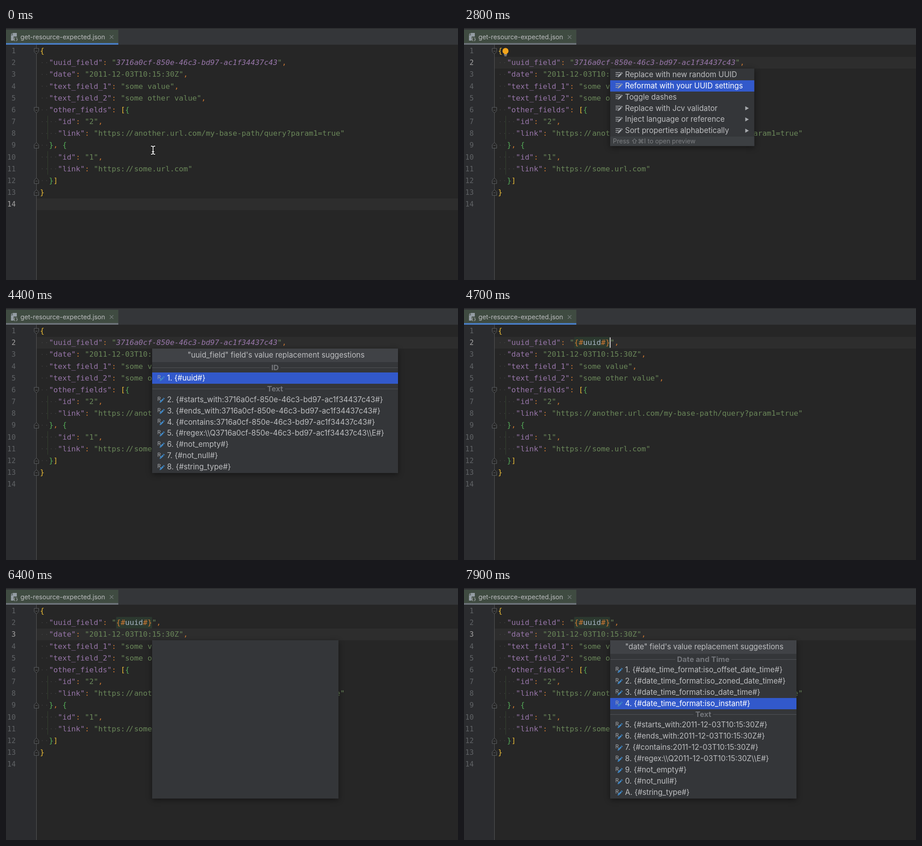
An HTML page with a canvas that plays this animation: 1002 px wide and 559 px high, repeating every 8 s.

```html
<!DOCTYPE html>
<html lang="en">
<head>
<meta charset="utf-8">
<title>Editor suggestions</title>
<style>
  html, body { margin: 0; width: 100%; height: 100%; overflow: hidden; background: #262626; }
  canvas { display: block; }
</style>
</head>
<body>
<canvas id="stage" width="1002" height="559"></canvas>
<script>
const ctx = document.getElementById('stage').getContext('2d');
const W = 1002, H = 559, LOOP = 8000;
const CODE_X = 75.3, CHAR = 9.935, LINE_TOP = 37.6, LINE_H = 26.17;
const ROW_H = 24.9, SEPARATOR_H = 22.9, TITLE_H = 30, POPUP_X = 324, CARET_COL = 25;
const MONO = '"DejaVu Sans Mono", "Noto Sans Mono", monospace';
const UI = 'Inter, "DejaVu Sans", sans-serif';
const UI_FONT = `16.6px ${UI}`;
const C = {
  editor: '#262626', gutter: '#2b2c2f', bar: '#343639', row: '#2d2d2d', popup: '#343639',
  key: '#9876aa', string: '#6a8759', punct: '#cc7832', yellow: '#e8ba36', green: '#54a857',
  text: '#bdbec0', dim: '#606366', select: '#3259cb', grey: '#a6a9ad'
};

const UUID = '3716a0cf-850e-46c3-bd97-ac1f34437c43';
const DATE = '2011-12-03T10:15:30Z';
const LINES = [
  '{',
  `  "uuid_field": "${UUID}",`,
  `  "date": "${DATE}",`,
  '  "text_field_1": "some value",',
  '  "text_field_2": "some other value",',
  '  "other_fields": [{',
  '    "id": "2",',
  '    "link": "https://another.url.com/my-base-path/query?param1=true"',
  '  }, {',
  '    "id": "1",',
  '    "link": "https://some.url.com"',
  '  }]',
  '}',
  ''
];
const TEMPLATE_LINE = '  "uuid_field": "{#uuid#}",';

const commonActions = ['Replace with Jcv validator', 'Inject language or reference', 'Sort properties alphabetically'];
const uuidActions = ['Replace with new random UUID', 'Reformat with your UUID settings', 'Toggle dashes', ...commonActions];
const textValidators = value => ['starts_with:' + value, 'ends_with:' + value, 'contains:' + value,
  `regex:\\\\Q${value}\\\\E`, 'not_empty', 'not_null', 'string_type'];
const isoFormats = ['offset_date_time', 'zoned_date_time', 'date_time', 'instant']
  .map(name => 'date_time_format:iso_' + name);

const lineTop = n => LINE_TOP + (n - 1) * LINE_H;
const colX = col => CODE_X + col * CHAR;

function rect(x, y, w, h, color) {
  ctx.fillStyle = color;
  ctx.fillRect(x, y, w, h);
}

function text(str, x, y, color, font, align = 'left') {
  ctx.font = font;
  ctx.textAlign = align;
  ctx.fillStyle = color;
  ctx.fillText(str, x, y);
}

function stroke(points, color, width = 1, close = false) {
  ctx.beginPath();
  points.forEach(([x, y]) => ctx.lineTo(x, y));
  if (close) ctx.closePath();
  ctx.strokeStyle = color;
  ctx.lineWidth = width;
  ctx.stroke();
}

function fillShape(points, color) {
  ctx.beginPath();
  points.forEach(([x, y]) => ctx.lineTo(x, y));
  ctx.fillStyle = color;
  ctx.fill();
}

function code(str, col, y, color, style = '') {
  const font = `${style} 16.5px ${MONO}`;
  const split = str.indexOf('//');
  if (split < 0) return text(str, colX(col), y, color, font);
  // Double slashes sit close together, as a ligature
  text(str.slice(0, split), colX(col), y, color, font);
  text('/', colX(col + split) + 1.6, y, color, font);
  text('/', colX(col + split + 1) - 1.6, y, color, font);
  text(str.slice(split + 2), colX(col + split + 2), y, color, font);
}

function drawString(str, col, y) {
  const inner = str.slice(1, -1);
  if (inner === UUID) {
    code('"', col, y, C.string);
    code(inner, col + 1, y, C.key, 'italic');
    code('"', col + 1 + inner.length, y, C.string);
  } else if (inner === '{#uuid#}') {
    rect(colX(col + 1), y - 18, 8 * CHAR, 25.5, '#2c392f');
    code('"', col, y, C.string);
    code('{#', col + 1, y, C.punct);
    code('uuid', col + 3, y, '#a9b7c6');
    code('#}', col + 7, y, C.punct);
    code('"', col + 9, y, C.string);
  } else code(str, col, y, C.string);
}

function drawLine(line, n) {
  const y = lineTop(n) + 18.4;
  const indent = line.search(/\S|$/);
  for (let i = 0; i < indent; i++) rect(colX(i + .5) - .7, y - 6, 1.4, 1.4, '#4b4b4b');
  for (const { 0: token, index } of line.matchAll(/"[^"]*"|[^\s"]/g)) {
    const isKey = line[index + token.length] === ':';
    if (token[0] === '"') isKey ? code(token, index, y, C.key) : drawString(token, index, y);
    else {
      const nested = '{}'.includes(token) && indent + index > 0;
      code(token, index, y, ':,'.includes(token) ? C.punct : nested ? C.green : C.yellow);
    }
  }
}

function foldMark(n, dir) {
  const y = lineTop(n) + 13.6;
  const shape = [[62.5, -6], [72.5, -6], [72.5, 1.5], [67.5, 6.5], [62.5, 1.5]].map(([x, dy]) => [x, y + dy * dir]);
  fillShape(shape, C.editor);
  stroke(shape, C.dim, 1, true);
  stroke([[65, Math.floor(y) + .5], [70, Math.floor(y) + .5]], C.dim);
}

function drawTab(focused) {
  rect(0, 0, W, 37, C.bar);
  rect(0, 0, W, 3, '#2a2b2d');
  rect(0, 2, W, 1, '#3b3c3e');
  rect(0, 4, 249, 33, '#3f4b41');
  rect(0, 33.5, 249, 3.5, focused ? '#4a80cb' : '#6f757c');
  fillShape([[15, 11], [24, 11], [24, 19], [17, 19], [17, 28], [11, 28], [11, 16], [15, 16]], '#939ca3');
  fillShape([[10.5, 15], [14, 11], [14, 15]], '#939ca3');
  text('{}', 16, 28, C.grey, `bold 9px ${MONO}`);
  text('get-resource-expected.json', 32, 25, C.text, `14.2px ${UI}`);
  stroke([[230, 16], [238, 24]], '#73797a', 1.2);
  stroke([[238, 16], [230, 24]], '#73797a', 1.2);
}

function drawEditor(active, replaced, focused) {
  rect(0, 0, W, H, C.editor);
  rect(0, 37, 67, H, C.gutter);
  rect(68, Math.round(lineTop(active)), W, 26, C.row);
  drawTab(focused);
  rect(67, 37, 1, H, '#555657');
  for (const n of [7, 10]) rect(92, lineTop(n), 1, 2 * LINE_H, '#34432f');
  LINES.forEach((line, i) => {
    const n = i + 1;
    text(n, 21.5, lineTop(n) + 18.4, n === active ? '#a4a3a3' : C.dim, `15.5px ${MONO}`, 'right');
    drawLine(replaced && n === 2 ? TEMPLATE_LINE : line, n);
  });
  [1, 6].forEach(n => foldMark(n, 1));
  [9, 12, 13].forEach(n => foldMark(n, -1));
}

function popupBox(y, w, h) {
  ctx.save();
  ctx.shadowColor = 'rgba(0,0,0,.45)';
  ctx.shadowBlur = 12;
  ctx.shadowOffsetY = 3;
  rect(POPUP_X, y, w, h, C.popup);
  ctx.restore();
}

function pencil(x, y, color) {
  stroke([[x + 6, y + 5], [x + 12, y - 1]], color, 3.4);
  stroke([[x + 12.8, y - 1.8], [x + 14.2, y - 3.2]], color, 3.4);
  fillShape([[x + 4, y + 7], [x + 4.6, y + 3.8], [x + 7.2, y + 6.4]], color);
}

function actionIcon(y) {
  stroke([[336, y - 4.5], [347, y - 4.5]], C.grey, 1.5);
  stroke([[336, y - .5], [343, y - .5]], C.grey, 1.5);
  stroke([[336, y + 3.5], [340, y + 3.5]], C.grey, 1.5);
  pencil(336.5, y - 1, C.grey);
}

function validatorIcon(y) {
  text('R', 335.5, y + 2.5, C.grey, `12px ${UI}`);
  pencil(336.5, y, '#3f87c5');
}

function popupRow(label, top, w, selected, icon) {
  const y = top + ROW_H / 2;
  if (selected) rect(POPUP_X, Math.round(top), w, 25, C.select);
  icon(y);
  text(label, 357, y + 5.6, selected ? '#fff' : C.text, UI_FONT);
}

function drawMenu({ top, width, items, selected, blank }) {
  const height = items.length * ROW_H + 22.3;
  popupBox(top, width, height);
  if (blank) return;
  items.forEach((label, i) => {
    const y = top + .8 + i * ROW_H;
    popupRow(label, y, width, i === selected, actionIcon);
    if (commonActions.includes(label)) {
      const x = POPUP_X + width - 20, mid = y + ROW_H / 2;
      fillShape([[x, mid - 4.5], [x + 8, mid], [x, mid + 4.5]], C.grey);
    }
  });
  const footer = top + items.length * ROW_H + 1.5;
  rect(POPUP_X, footer, width, top + height - footer, '#3c3f42');
  text('Press ⇧⌘I to open preview', 330, footer + 15.2, '#7d7f82', `14px ${UI}`);
}

function drawSeparator(label, top, width) {
  const y = Math.floor(top + 12) + .5, mid = POPUP_X + width / 2;
  text(label, mid, y + 5.7, '#73757a', `bold ${UI_FONT}`, 'center');
  const half = ctx.measureText(label).width / 2 + 4;
  stroke([[POPUP_X, y], [mid - half, y]], '#515357');
  stroke([[mid + half, y], [POPUP_X + width, y]], '#515357');
}

function drawSuggestions({ top, width, field, groups, selected, blank }) {
  const count = groups.reduce((sum, group) => sum + group.items.length, 0);
  popupBox(top, width, Math.round(TITLE_H + groups.length * SEPARATOR_H + count * ROW_H + 1));
  if (blank) return;
  rect(POPUP_X, top, width, TITLE_H, '#404246');
  text(`"${field}" field's value replacement suggestions`, POPUP_X + width / 2 + 2.2, top + 20,
    C.text, UI_FONT, 'center');
  let y = top + TITLE_H, index = 0;
  for (const { name, items } of groups) {
    drawSeparator(name, y, width);
    y += SEPARATOR_H;
    for (const item of items) {
      popupRow(`${'1234567890A'[index]}. {#${item}#}`, y, width, index === selected, validatorIcon);
      index++;
      y += ROW_H;
    }
  }
}

function drawBulb() {
  ctx.beginPath();
  ctx.arc(92, 51, 6.7, 0, 7);
  ctx.fillStyle = '#f2a51c';
  ctx.fill();
  rect(89, 55, 6, 3, '#f2a51c');
  rect(88.5, 58.5, 7, 1.3, '#b5b7b9');
  rect(89.5, 61, 5, 1.3, '#b5b7b9');
}

function drawPointer(x, y) {
  for (const [color, width] of [['#111', 4], ['#f4f4f4', 1.8]]) {
    ctx.lineCap = 'round';
    for (const dir of [-1, 1]) {
      stroke([[x - 4, y + 9 * dir], [x - 1.5, y + 8.7 * dir], [x, y + 7 * dir],
        [x + 1.5, y + 8.7 * dir], [x + 4, y + 9 * dir]], color, width);
    }
    stroke([[x, y - 7], [x, y + 7]], color, width);
    stroke([[x - 2, y + 3.5], [x + 2, y + 3.5]], color, width);
    ctx.lineCap = 'butt';
  }
}

const passed = (t, ...times) => times.filter(time => t >= time).length;
const within = (t, from, to) => t >= from && t < to;

function drawCaret(t, line) {
  const resetAt = [100, 800, 4600, 5200].filter(time => t >= time).pop();
  if (resetAt === undefined || (t - resetAt) % 1000 >= 500) return;
  rect(Math.floor(colX(line === 14 ? 0 : CARET_COL)), lineTop(line) + 1.5, 2, 23, '#d0d0d0');
}

function draw(t) {
  const active = t < 800 ? 14 : t < 5200 ? 2 : 3;
  const focused = t < 1700 || within(t, 4600, 5700);
  drawEditor(active, t >= 4600, focused);
  if (focused) drawCaret(t, active);
  if (within(t, 1700, 3400)) drawBulb();

  const top = Math.round(lineTop(active + 1));
  if (within(t, 1600, 3400)) {
    drawMenu({ top, width: 319.5, items: uuidActions, selected: passed(t, 2800, 3000, 3200), blank: t < 1700 });
  } else if (within(t, 3400, 4500)) {
    drawSuggestions({ top, width: 545, field: 'uuid_field', selected: 0, blank: t < 3500,
      groups: [{ name: 'ID', items: ['uuid'] }, { name: 'Text', items: textValidators(UUID) }] });
  } else if (within(t, 5600, 6400)) {
    drawMenu({ top, width: 304.5, items: commonActions, selected: 0, blank: t < 5700 });
  } else if (t >= 6400) {
    drawSuggestions({ top, width: 413, field: 'date', selected: passed(t, 7300, 7500, 7700), blank: t < 6500,
      groups: [{ name: 'Date and Time', items: isoFormats }, { name: 'Text', items: textValidators(DATE) }] });
  }

  if (t < 1600) {
    const p = Math.min(1, Math.max(0, (t - 50) / 600));
    const eased = p * p * (3 - 2 * p);
    drawPointer(326 + 3 * eased, 271 - 189 * eased);
  }
}

function tick() {
  draw(Math.floor(performance.now() % LOOP / 100) * 100);
  requestAnimationFrame(tick);
}
tick();
</script>
</body>
</html>
```
